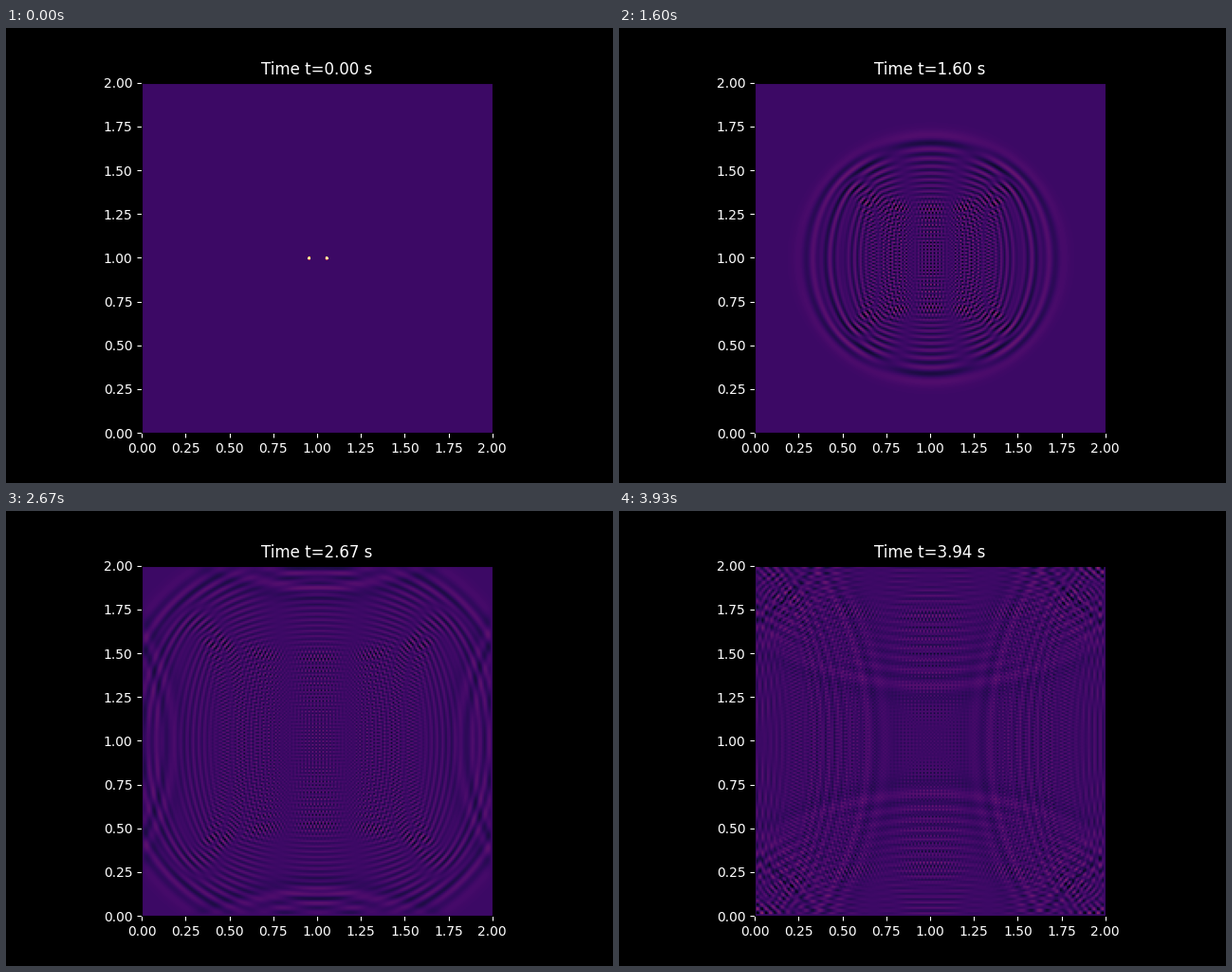
A matplotlib script that plays this animation: 640x480 px, repeating every 3990 ms.

```python
import numpy as np
import matplotlib.pyplot as plt
from matplotlib.animation import FuncAnimation

SIZE = 2.0            # side of the square membrane
N = 200               # cells per side
SPEED = 0.2 ** 0.5
DT = 4 / 1199
SUBSTEPS = 20         # time steps per picture
FRAMES = 60
LOOP_MS = 3990


def laplacian(u):
    lap = np.zeros_like(u)
    lap[1:-1, 1:-1] = (u[2:, 1:-1] + u[:-2, 1:-1] + u[1:-1, 2:]
                       + u[1:-1, :-2] - 4 * u[1:-1, 1:-1])
    return lap


def simulate():
    """Leapfrog wave equation with fixed edges and two point impulses."""
    r2 = (SPEED * DT * N / SIZE) ** 2
    u = np.zeros((N, N))
    u[100, [95, 105]] = 1.0
    prev = u + 0.5 * r2 * laplacian(u)
    fields = [u]
    for _ in range(FRAMES - 1):
        for _ in range(SUBSTEPS):
            u, prev = 2 * u - prev + r2 * laplacian(u), u
        fields.append(u)
    return fields


fields = simulate()

fig, ax = plt.subplots(figsize=(6.4, 4.8), dpi=100, facecolor="black")
ax.set_facecolor("black")
ax.tick_params(colors="white")
image = ax.imshow(fields[0], cmap="inferno", vmin=-0.023, vmax=0.098,
                  extent=(0, SIZE, 0, SIZE))
ticks = np.linspace(0, SIZE, 9)
ax.set_xticks(ticks)
ax.set_yticks(ticks)
title = ax.set_title("Time t=0.00 s", color="white")


def update(i):
    image.set_data(fields[i])
    title.set_text(f"Time t={i * SUBSTEPS * DT:.2f} s")
    return image, title


anim = FuncAnimation(fig, update, frames=FRAMES, interval=LOOP_MS / FRAMES,
                     repeat=True, repeat_delay=0, blit=False)
plt.show()
```
